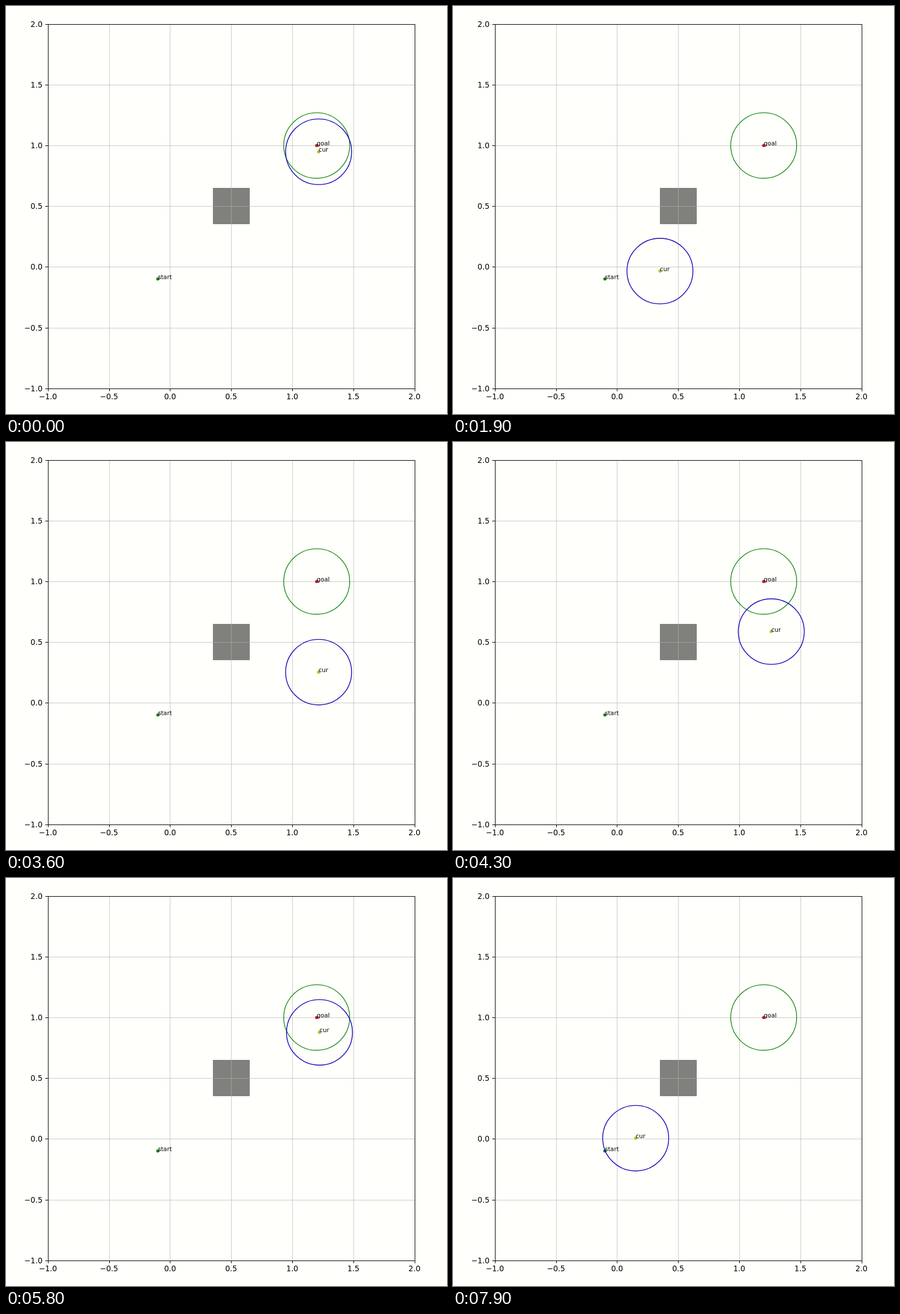
An HTML page for the animation above (8000 ms loop, 778 px wide and 720 px high).

```html
<!DOCTYPE html>
<html lang="en">
<head>
<meta charset="utf-8">
<title>Path planning plot</title>
<style>
  html, body { margin: 0; width: 100%; height: 100%; overflow: hidden; background: #fffffc; }
  svg { display: block; width: 778px; height: 720px; }
  text { font-family: "DejaVu Sans", sans-serif; font-size: 13.3px; fill: #000; }
  .tag { font-size: 10.65px; }
  .grid { stroke: #b0b0b0; stroke-opacity: .65; }
  .axis { stroke: #000; fill: none; }
  .ring { fill: none; stroke-width: 1.39; }
</style>
</head>
<body>
<svg id="plot" viewBox="0 0 778 720"></svg>
<script>
const plot = document.getElementById('plot');
const unitX = 215.56, unitY = 214.2;
const px = x => 73.9 + (x + 1) * unitX;
const py = y => 674.6 - (y + 1) * unitY;
const snap = v => Math.round(v) + 0.5;

function add(parent, tag, attrs, text) {
  const el = document.createElementNS('http://www.w3.org/2000/svg', tag);
  for (const key in attrs) el.setAttribute(key, attrs[key]);
  if (text) el.textContent = text;
  parent.appendChild(el);
  return el;
}
const line = (cls, x1, y1, x2, y2) => add(plot, 'line', { class: cls, x1, y1, x2, y2 });

function box(cls, x0, y0, x1, y1, fill) {
  const edge = fill ? Math.round : snap;
  const x = edge(px(x0)), y = edge(py(y1));
  add(plot, 'rect', {
    class: cls, x, y, width: edge(px(x1)) - x, height: edge(py(y0)) - y, fill: fill || 'none'
  });
}

function marker(name, x, y, dot, ring) {
  const g = add(plot, 'g', { transform: `translate(${x} ${y})` });
  if (ring) add(g, 'ellipse', { class: 'ring', rx: 0.27 * unitX, ry: 0.27 * unitY, stroke: ring });
  add(g, 'circle', { r: 2.75, fill: dot });
  add(g, 'text', { class: 'tag' }, name);
  return g;
}

// Obstacle, grid, ticks and tick labels
box('', 0.35, 0.35, 0.65, 0.65, '#80807d');
for (let v = -1; v <= 2; v += 0.5) {
  const x = snap(px(v)), y = snap(py(v));
  const label = v.toFixed(1).replace('-', '\u2212');
  if (v > -1 && v < 2) {
    line('grid', x, 32, x, 675);
    line('grid', 74, y, 721, y);
  }
  line('axis', x, 675, x, 679.9);
  line('axis', 69.2, y, 74, y);
  add(plot, 'text', { x: px(v), y: 694.3, 'text-anchor': 'middle' }, label);
  add(plot, 'text', { x: 64.4, y: py(v) + 5, 'text-anchor': 'end' }, label);
}
box('axis', -1, -1, 2, 2);

marker('goal', px(1.2), py(1), '#d01020', '#1c8c1c');
marker('start', px(-0.1), py(-0.1), '#108010');
const cur = marker('cur', 0, 0, '#b8bc20', '#1000b8');

// Key points of the drive: step, x, y
const path = [
  [8, 291, 464.2], [11, 313.7, 460.2], [12.5, 322.3, 459.2], [18, 355.8, 465.9],
  [26, 442.7, 482.2], [30, 495, 474], [36, 551.5, 406.2], [42, 561.4, 342],
  [50, 556, 297.2], [63, 551.8, 261], [71, 551.6, 252.2]
];

// Stage time to path step; the next run begins with a short stall
function pathStep(k) {
  if (k < 7) return 65.3 + 0.9 * k;
  if (k < 72) return k;
  return k === 72 ? 7 : 8 + 0.9 * Math.max(0, k - 74);
}

function slope(i, axis) {
  const a = path[Math.max(i - 1, 0)], b = path[Math.min(i + 1, path.length - 1)];
  return (b[axis] - a[axis]) / (b[0] - a[0]);
}

function position(step) {
  if (step < path[0][0]) return [px(-0.1), py(-0.1)];
  let i = path.length - 2;
  while (path[i][0] > step) i--;
  const a = path[i], b = path[i + 1], h = b[0] - a[0], u = (step - a[0]) / h;
  return [1, 2].map(axis => {
    const m = slope(i, axis) * h, n = slope(i + 1, axis) * h, d = b[axis] - a[axis];
    return a[axis] + u * (m + u * (3 * d - 2 * m - n + u * (m + n - 2 * d)));
  });
}

const began = performance.now();
function draw() {
  const t = Math.max(0, performance.now() - began) % 8000;
  const [x, y] = position(pathStep(Math.floor(t / 100)));
  cur.setAttribute('transform', `translate(${x.toFixed(2)} ${y.toFixed(2)})`);
  requestAnimationFrame(draw);
}
draw();
</script>
</body>
</html>
```
